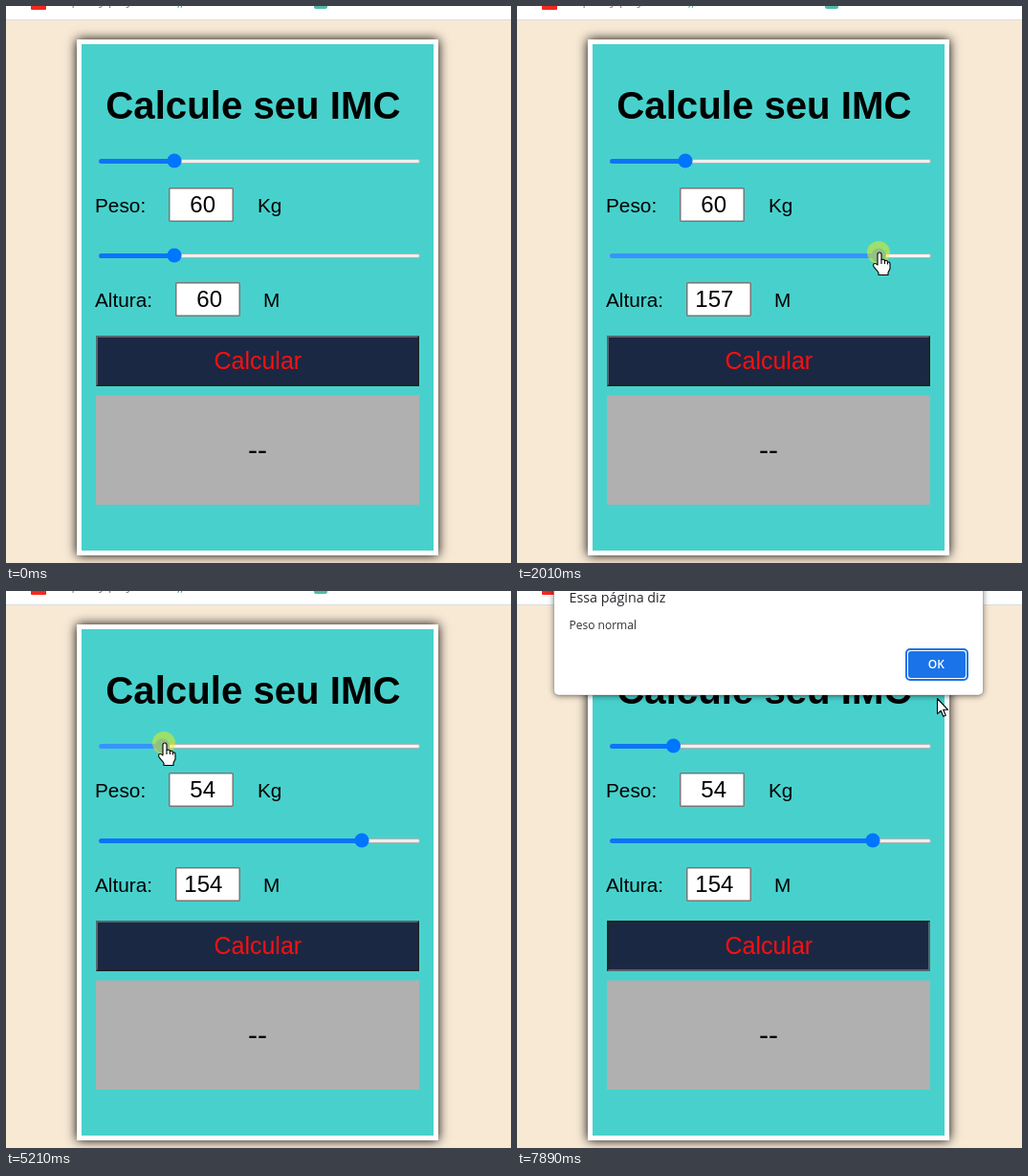
These frames come from a looping animation (528 px wide and 583 px high, 8 s). An HTML page with a canvas:

```html
<!DOCTYPE html>
<html lang="pt">
<head>
<meta charset="utf-8">
<title>Calcule seu IMC</title>
<style>
  html, body { margin: 0; width: 100%; height: 100%; overflow: hidden; }
  canvas { display: block; }
</style>
</head>
<body>
<canvas id="stage" width="528" height="583"></canvas>
<script>
const ctx = document.getElementById('stage').getContext('2d');
const LOOP = 8000;
const SANS = '"Liberation Sans", Arial, sans-serif';
const UI = '"Open Sans", "Noto Sans", sans-serif';

const ARROW = new Path2D('M.5 .5V16.6L4.2 13.2L6.8 19.2L9.2 18.2L6.7 12.3H11.6Z');
const HAND = new Path2D('M-2 13V2Q-2 0 0 0Q2 0 2 2V7.5Q5 6.5 5.4 8.6Q8.2 7.8 8.5 10Q11 9.6 11 12V17L9 21V23.5H-1V21L-6 14.8Q-7.2 12 -5 11.5Q-4 11.3 -2 13Z');
const KNUCKLES = new Path2D('M2 7.5V12M5.4 8.6V12M8.5 10V12.5');

// Pointer steps: time, shape, x, y
const pointer = [
  [0, '', 0, 0], [140, 'arrow', 274, 283],
  [400, 'hand', 277, 269], [530, 'hand', 280, 262], [660, 'hand', 282, 259],
  [940, 'press', 282, 258], [1060, 'press', 286, 258], [1190, 'press', 290, 258],
  [1330, 'press', 320, 258], [1460, 'press', 343, 258],
  [1730, 'press', 366, 258], [1860, 'press', 377, 258], [2010, 'press', 378, 258],
  [2530, 'press', 376, 257], [2660, 'press', 374, 257], [2790, 'press', 372, 257],
  [3360, 'arrow', 310, 220], [3490, 'arrow', 241, 197],
  [3630, 'hand', 195, 168], [3760, 'hand', 182, 163], [3890, 'hand', 176, 161],
  [4030, 'hand', 173, 161], [4280, 'press', 174, 161], [4410, 'press', 170, 160],
  [4550, 'press', 163, 160], [4680, 'press', 158, 160],
  [5080, 'press', 162, 159], [5210, 'press', 165, 159],
  [6050, 'arrow', 205, 260], [6150, 'hand', 250, 347],
  [6290, 'press', 276, 385], [6420, 'hand', 276, 385],
  [6820, 'arrow', 225, 250], [6950, 'arrow', 162, 101],
  [7100, 'arrow', 135, 60], [7230, 'arrow', 110, 25],
  [7360, 'arrow', 85, 40], [7490, 'arrow', 69, 57],
  [7630, 'arrow', 190, 75], [7760, 'arrow', 370, 100], [7890, 'arrow', 439, 112]
];
const weight = [[0, 60], [4410, 58], [4550, 54], [4680, 52], [5080, 53], [5210, 54]];
const height = [[0, 60], [940, 110], [1060, 112], [1190, 113], [1330, 128], [1460, 140],
  [1730, 152], [1860, 156], [2010, 157], [2530, 156], [2660, 155], [2790, 154]];

const stepAt = (steps, t) => steps.findLast(step => step[0] <= t);

function rect(x, y, w, h, fill) {
  ctx.fillStyle = fill;
  ctx.fillRect(x, y, w, h);
}

function round(x, y, w, h, r, fill, stroke) {
  ctx.beginPath();
  ctx.roundRect(x, y, w, h, r);
  if (fill) { ctx.fillStyle = fill; ctx.fill(); }
  if (stroke) { ctx.strokeStyle = stroke; ctx.stroke(); }
}

function text(str, x, y, font, color = '#000', align = 'left') {
  ctx.font = font;
  ctx.fillStyle = color;
  ctx.textAlign = align;
  ctx.fillText(str, x, y);
}

function disc(x, y, r, fill) {
  ctx.beginPath();
  ctx.arc(x, y, r, 0, Math.PI * 2);
  ctx.fillStyle = fill;
  ctx.fill();
}

function withShadow(color, blur, offsetY, paint) {
  ctx.save();
  ctx.shadowColor = color;
  ctx.shadowBlur = blur;
  ctx.shadowOffsetY = offsetY;
  paint();
  ctx.restore();
}

function page() {
  rect(0, 0, 528, 583, '#f8e9d5');
  rect(0, 0, 528, 14, '#fff');
  rect(0, 14, 528, 1, '#dadce0');
  round(26, -8, 16, 12, 1, '#f5281e');
  round(322, -8, 14, 11, 2, '#54b9a5');
  text('Simplicity play', 46, -1, '13px ' + UI, '#8b7868');
  text(',,', 179, 0, '13px ' + UI, '#41a88c');

  withShadow('#000', 11, 0, () => rect(74, 35, 378, 540, '#fff'));
  rect(79, 40, 368, 530, '#48d1cc');
  text('Calcule seu IMC', 104.3, 118, 'bold 40.2px ' + SANS);
}

function slider(y, value, state) {
  const [fill, thumb, empty] = {
    idle: ['#0d74f5', '#0075ff', '#efefef'],
    hover: ['#0f5bbb', '#005cc8', '#e5e5e5'],
    press: ['#3793ff', '#3793ff', '#f5f5f5']
  }[state];
  const x = 176 + (value - 60) * 2.085;
  ctx.lineWidth = 1;
  round(97.5, y - 1.5, 335, 4, 2, empty, '#b2b2b2');
  round(97, y - 2, x - 97, 5, 2.5, fill);
  disc(x, y, 7.6, thumb);
}

function field(label, unit, x, unitX, y, value) {
  const font = '20.8px ' + SANS;
  text(label, 93, y + 26, font);
  text(unit, unitX, y + 26, font);
  ctx.lineWidth = 1.5;
  round(x + .75, y + .75, 66.5, 34.5, 1, '#fff', '#767676');
  text(value, x + (value > 99 ? 29.3 : 35.7), y + 26, '24px ' + SANS, '#000', 'center');
}

function button(sunk) {
  const light = '#56656e', dark = '#1c2428';
  rect(94, 345, 338, 53, sunk ? light : dark);
  ctx.beginPath();
  ctx.moveTo(94, 398);
  ctx.lineTo(94, 345);
  ctx.lineTo(432, 345);
  ctx.lineTo(430, 347);
  ctx.lineTo(96, 347);
  ctx.lineTo(96, 396);
  ctx.fillStyle = sunk ? dark : light;
  ctx.fill();
  rect(96, 347, 334, 49, '#1b2843');
  text('Calcular', 263.3, 380, '25px ' + SANS, '#fb1010', 'center');
}

function dialog() {
  withShadow('rgba(0,0,0,.5)', 6, 1, () => round(38.5, -20, 449, 129, 5, '#fff'));
  ctx.lineWidth = 1;
  round(38.5, -20, 449, 129, 5, null, 'rgba(0,0,0,.2)');
  text('Essa página diz', 54.5, 12, '14.3px ' + UI, '#26282c');
  text('Peso normal', 54.5, 40, '12px ' + UI, '#303236');
  ctx.lineWidth = 2;
  round(407, 61, 64, 32, 4, '#fff', '#1a73e8');
  round(409, 63, 60, 28, 3, '#1a73e8');
  text('OK', 438.3, 81, '600 12px ' + UI, '#fff', 'center');
}

function drawPointer(shape, x, y) {
  if (!shape) return;
  if (shape === 'press') disc(x, y, 12, 'rgba(240,240,10,.5)');
  ctx.save();
  ctx.translate(shape === 'arrow' ? x : x + 1, y);
  ctx.lineWidth = 1.1;
  ctx.lineJoin = 'round';
  ctx.fillStyle = '#fff';
  ctx.strokeStyle = '#000';
  const path = shape === 'arrow' ? ARROW : HAND;
  ctx.fill(path);
  ctx.stroke(path);
  if (path === HAND) ctx.stroke(KNUCKLES);
  ctx.restore();
}

function sliderState(shape, t, from, to) {
  if (t < from || t >= to) return 'idle';
  return shape === 'press' ? 'press' : 'hover';
}

function draw(t) {
  const [, shape, x, y] = stepAt(pointer, t);
  const kg = stepAt(weight, t)[1];
  const cm = stepAt(height, t)[1];
  page();
  slider(162, kg, sliderState(shape, t, 3760, 6050));
  field('Peso:', 'Kg', 170, 263, 190, kg);
  slider(261, cm, sliderState(shape, t, 530, 3360));
  field('Altura:', 'M', 177, 269, 289, cm);
  button(t >= 6290);
  rect(94, 407.5, 338, 114.5, '#b0b0b0');
  text('--', 263, 475, '30px ' + SANS, '#000', 'center');
  if (t >= 6420) dialog();
  drawPointer(shape, x, y);
}

const start = performance.now();
function tick() {
  draw((performance.now() - start) % LOOP);
  requestAnimationFrame(tick);
}
tick();
</script>
</body>
</html>
```
